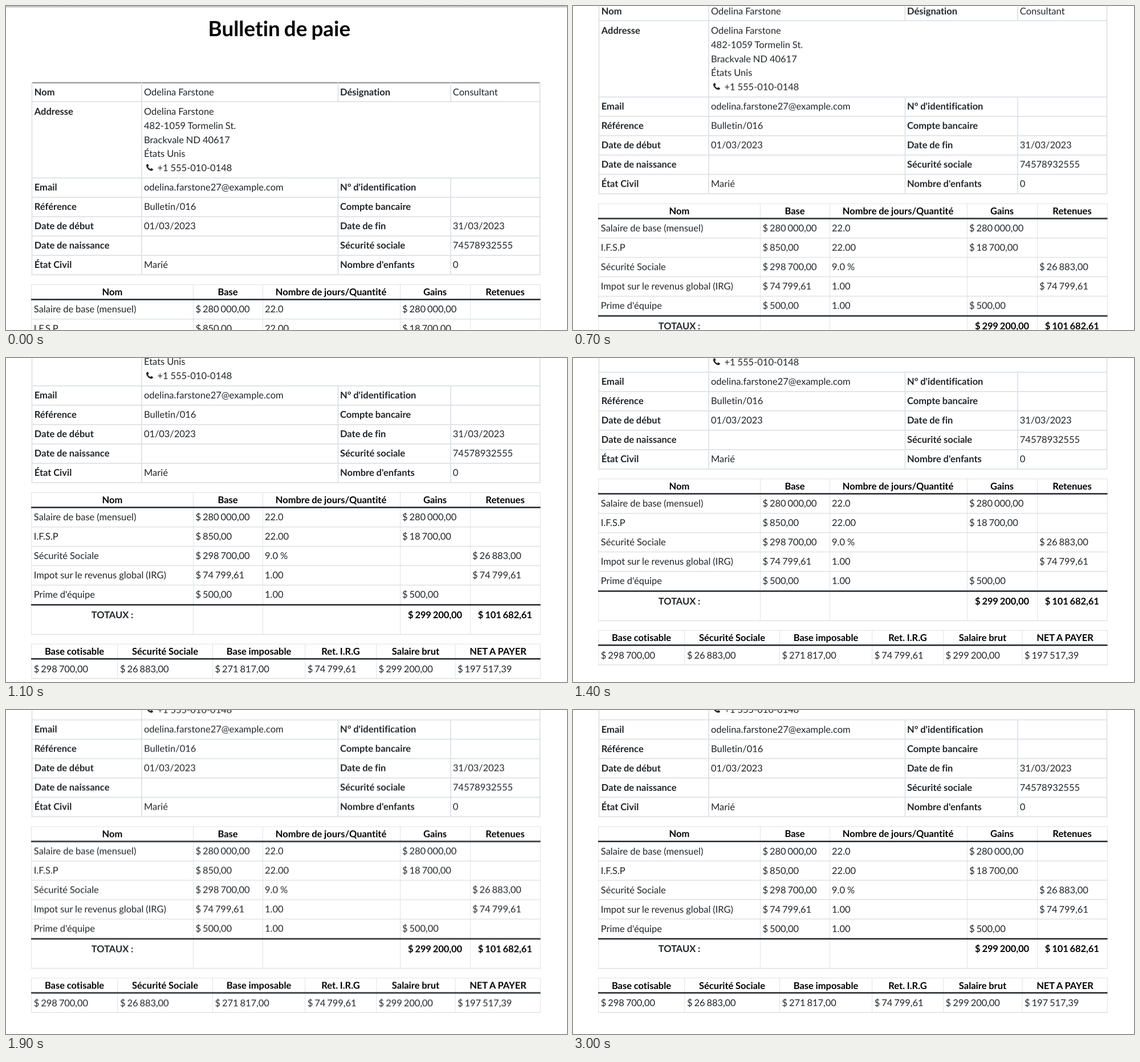
An HTML page that plays this animation: 984x569 px, repeating every 3.2 s.

```html
<!DOCTYPE html>
<html lang="fr">
<head>
<meta charset="utf-8">
<title>Bulletin de paie</title>
<style>
  html, body { margin: 0; width: 100%; height: 100%; overflow: hidden; background: #fff; }
  svg { display: block; width: 984px; height: 569px; background: #fff; isolation: isolate; }
  text {
    font: 16.5px Lato, "Open Sans", sans-serif;
    font-variant-ligatures: none;
    word-spacing: -.02em;
    fill: #212529;
    text-rendering: geometricPrecision;
  }
  .b { font-weight: 700; }
  .k { fill: #000; }
  .c { text-anchor: middle; }
  .num { word-spacing: -.065em; letter-spacing: -.005em; }
  .title { font-size: 36.8px; word-spacing: -.05em; }
  #page { animation: scroll 3200ms infinite; }
  #flash { fill: #f00; mix-blend-mode: screen; animation: flash 3200ms step-end infinite; }
  @keyframes scroll {
    0% { transform: translateY(0); animation-timing-function: step-end; }
    15.625% { transform: translateY(0); animation-timing-function: steps(5, start); }
    31.25% { transform: translateY(-237px); animation-timing-function: steps(5, start); }
    46.875% { transform: translateY(-277px); animation-timing-function: steps(5, start); }
    62.5%, 100% { transform: translateY(-284.6px); }
  }
  @keyframes flash {
    0%, 81.25%, 93.75%, 100% { visibility: hidden; }
    75%, 87.5% { visibility: visible; }
  }
</style>
</head>
<body>
<svg viewBox="0 0 984 569">
  <defs>
    <linearGradient id="shade" x2="0" y2="1">
      <stop offset="0" stop-color="#b4b4b4"/>
      <stop offset="1" stop-color="#fff"/>
    </linearGradient>
  </defs>
  <g id="page">
    <rect width="984" height="4" fill="url(#shade)"/>
    <text class="title b k c" x="479.3" y="53">Bulletin de paie</text>
  </g>
  <rect id="flash" x="47" y="371" width="770" height="23"/>
</svg>
<script>
const NS = 'http://www.w3.org/2000/svg';
const page = document.getElementById('page');
const LIGHT = '#dee2e6', DARK = '#212529';

function add(tag, attrs, content = '') {
  const el = document.createElementNS(NS, tag);
  for (const key in attrs) el.setAttribute(key, attrs[key]);
  el.textContent = content;
  page.append(el);
}
const rect = (x, y, width, height, fill = LIGHT) => add('rect', { x, y, width, height, fill });

// Amounts and dates are set tighter than words
function text(x, y, content, cls = '') {
  if (/^\$|\d\/\d/.test(content)) cls += ' num';
  if (content) add('text', { x, y, class: cls }, content);
}
const row = (xs, y, cells, cls) => cells.forEach((cell, i) => text(xs[i], y, cell, cls));

// Employee details
const PITCH = 33.95;
rect(46, 134.4, 891, 1, DARK);
for (const y of [168, 302, 336, 370, 404, 438, 472]) rect(44.6, y - 1, 892.6, 1.8);
for (const x of [44.6, 237, 935.6]) rect(x, 134.4, 1.8, 338);
for (const x of [581.6, 779]) {
  rect(x, 134.4, 1.8, 33.6);
  rect(x, 302, 1.8, 170);
}

const labelX = [49.8, 586], valueX = [242, 783.8];
function details(y, label1, value1, label2, value2) {
  row(labelX, y, [label1, label2], 'b');
  row(valueX, y, [value1, value2]);
}
details(157.3, 'Nom', 'Odelina Farstone', 'Désignation', 'Consultant');
details(191.2, 'Addresse', '', '', '');
['Odelina Farstone', '482-1059 Tormelin St.', 'Brackvale ND 40617', 'États Unis']
  .forEach((line, i) => text(242, 191.2 + i * 24.72, line));
text(265.4, 290, '+1 555-010-0148');
add('path', {
  transform: 'translate(245.8 277)', fill: DARK,
  d: 'M3 .3C1 .8 0 2 .2 3.6C.7 8 5 12 9 12.4C11 12.5 12 11.5 12.3 9.6L9 7.8L7.3 9.3C5.5 8.5 4 7 3.2 5.3L4.8 3.6Z'
});
[
  ['Email', 'odelina.farstone27@example.com', "N° d'identification", ''],
  ['Référence', 'Bulletin/016', 'Compte bancaire', ''],
  ['Date de début', '01/03/2023', 'Date de fin', '31/03/2023'],
  ['Date de naissance', '', 'Sécurité sociale', '74578932555'],
  ['État Civil', 'Marié', "Nombre d'enfants", '0']
].forEach((cells, i) => details(324.4 + i * PITCH, ...cells));

// Grid shared by the two amount tables
function grid(columns, top, bottom, thin, thick) {
  for (const x of columns) rect(x - 0.5, top, 1, bottom - top);
  rect(44, top, 893.5, 1);
  for (const y of thin) rect(44, y - 0.7, 893.5, 1.5);
  for (const y of thick) rect(44, y - 1.2, 893.5, 2.5, DARK);
}

// Pay lines
grid([44.7, 328.5, 450.5, 691.5, 814.5, 937.3], 488.8, 738.8,
  [549.7, 583.6, 617.5, 651.7, 738.4], [515.4, 686.4]);
row([186.5, 389, 570, 752.5, 875.5], 508.1,
  ['Nom', 'Base', 'Nombre de jours/Quantité', 'Gains', 'Retenues'], 'b k c');
[
  ['Salaire de base (mensuel)', '$ 280 000,00', '22.0', '$ 280 000,00', ''],
  ['I.F.S.P', '$ 850,00', '22.00', '$ 18 700,00', ''],
  ['Sécurité Sociale', '$ 298 700,00', '9.0 %', '', '$ 26 883,00'],
  ['Impot sur le revenus global (IRG)', '$ 74 799,61', '1.00', '', '$ 74 799,61'],
  ["Prime d'équipe", '$ 500,00', '1.00', '$ 500,00', '']
].forEach((cells, i) => row([48.8, 332.4, 454, 695, 818], 538.4 + i * PITCH, cells));
text(186.5, 709.5, 'TOTAUX :', 'b c');
row([752.5, 875.3], 709.5, ['$ 299 200,00', '$ 101 682,61'], 'b k c');

// Summary
grid([44.7, 195.8, 362.5, 524.7, 649.7, 788, 937.3], 754.8, 816.2, [815.7], [781.3]);
row([120, 279, 443.5, 587, 718.5, 863], 774.3,
  ['Base cotisable', 'Sécurité Sociale', 'Base imposable', 'Ret. I.R.G', 'Salaire brut', 'NET A PAYER'], 'b k c');
row([48.8, 199.9, 366.5, 528.7, 653.6, 792], 804.6,
  ['$ 298 700,00', '$ 26 883,00', '$ 271 817,00', '$ 74 799,61', '$ 299 200,00', '$ 197 517,39']);
</script>
</body>
</html>
```
